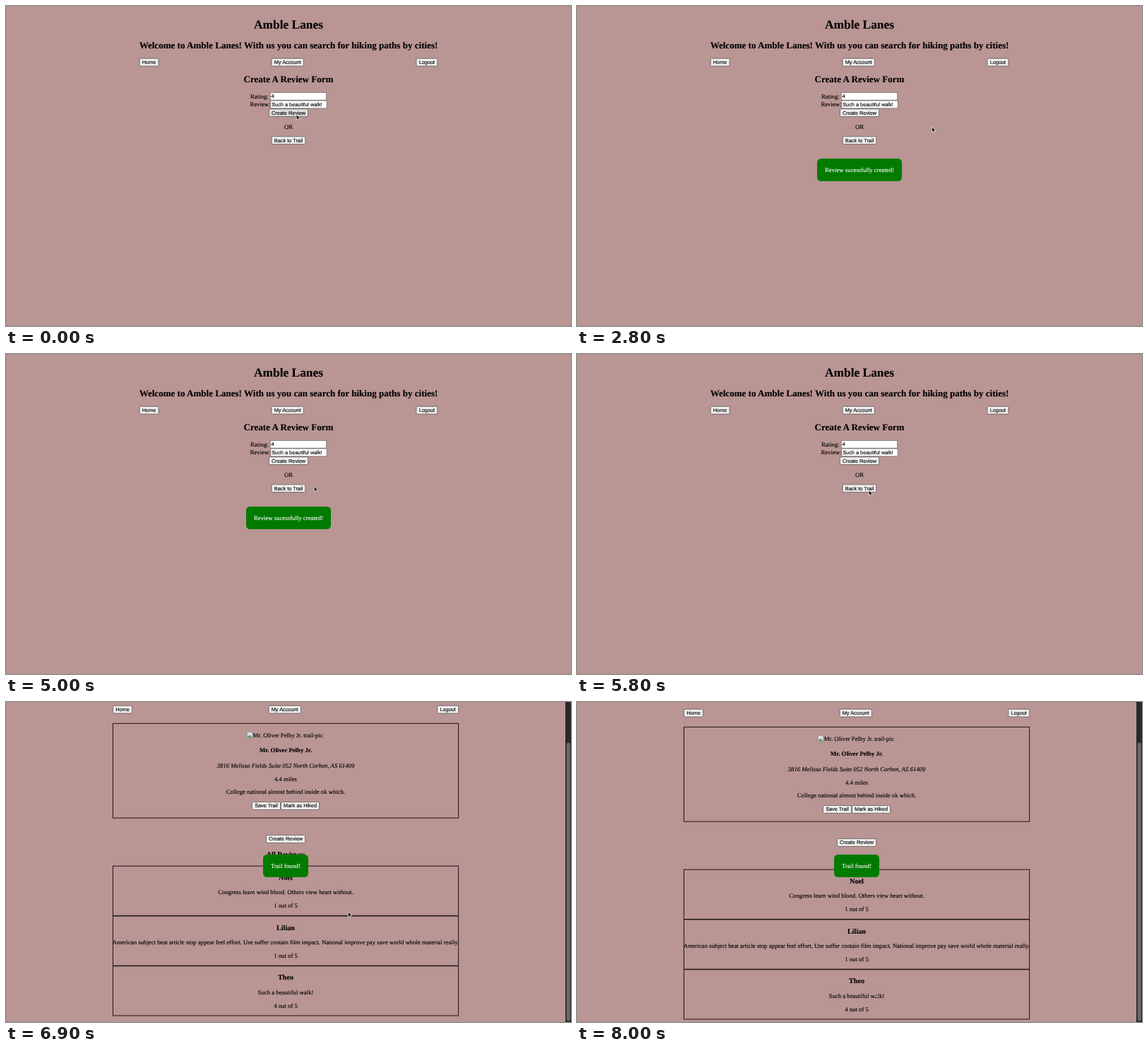
An HTML page that plays this animation: 800 px wide and 453 px high, repeating every 8100 ms.

```html
<!DOCTYPE html>
<html lang="en">
<head>
<meta charset="utf-8">
<title>Amble Lanes</title>
<style>
html, body { margin: 0; width: 100%; height: 100%; overflow: hidden; background: #b99593; }
svg { display: block; width: 800px; height: 453px; color: #000; }
text {
  font: 8.74px "Liberation Serif", "Times New Roman", serif;
  text-anchor: middle; text-rendering: geometricPrecision; white-space: pre;
  fill: currentColor; stroke: currentColor; stroke-width: .12;
}
.h1 { font-size: 17.4px; font-weight: bold; }
.h2 { font-size: 13.05px; font-weight: bold; }
.h3 { font-size: 10.2px; font-weight: bold; }
.h4 { font-weight: bold; }
.it { font-style: italic; }
.left { text-anchor: start; }
.ui { font: 7.35px "Liberation Sans", Arial, sans-serif; }
.btn { fill: #efefef; stroke: #5f5757; stroke-width: .8; }
.hover { fill: #dedede; }
.field { fill: #fff; stroke: #767070; stroke-width: .8; }
.card { fill: none; stroke: #1c1515; stroke-width: 1; }
.toast { color: #fff; }
.toast rect { fill: #007b00; }
</style>
</head>
<body>
<svg id="stage" viewBox="0 0 800 453"></svg>
<script>
const LOOP = 8100, STEP = 100;

const text = (s, x, y, cls = '') => `<text x="${x}" y="${y}" class="${cls}">${s}</text>`;
const rect = (x, y, w, h, cls, r = 0) =>
  `<rect x="${x}" y="${y}" width="${w}" height="${h}" rx="${r}" class="${cls}"/>`;
const button = (s, x, y, w, id = '') =>
  `<g id="${id}">${rect(x + .4, y + .4, w - .8, 10.8, 'btn', 1.4)}${text(s, x + w / 2, y + 8.2, 'ui')}</g>`;
const field = (s, x, y) => rect(x + .4, y + .4, 79.4, 10.8, 'field') + text(s, x + 1.8, y + 8.4, 'ui left');
const toast = (id, s, x, w) =>
  `<g id="${id}" class="toast">${rect(x - w / 2, 216, w, 32, '', 5.5)}${text(s, x, 235)}</g>`;

const header = (mid, left, right) =>
  text('Amble Lanes', mid, 32, 'h1') +
  text('Welcome to Amble Lanes! With us you can search for hiking paths by cities!', mid, 59.6, 'h2') +
  button('Home', left, 73.8, 27.6) +
  button('My Account', mid - 24.3, 73.8, 46) +
  button('Logout', right - 30.6, 73.8, 30.6);

const review = ([name, words, stars], i) => {
  const y = 301.2 + i * 70.8;
  return rect(151.4, y, 489.2, 70.2, 'card') + text(name, 396, y + 19.6, 'h3') +
    text(words, 396, y + 40.2) + text(stars + ' out of 5', 396, y + 59);
};

const formPage = header(400, 188.8, 611.2) +
  text('Create A Review Form', 400, 107.8, 'h2') +
  text('Rating:', 346, 130.5, 'left') + field('4', 373.8, 122) +
  text('Review:', 345.4, 142.3, 'left') + field('Such a beautiful walk!', 374.4, 133.6) +
  button('Create Review', 372, 145.4, 56, 'create') +
  text('OR', 400, 174) +
  button('Back to Trail', 375.8, 184.4, 48.4);

const brokenImage = `<path d="M341.6 111.4h5l2.2 2.2v6h-7.2z" fill="#d8e2ee" stroke="#8a8a8a" stroke-width=".6"/>
  <path d="M342 118.6l2.6-3 4 3.6v.2H342z" fill="#4fa447"/>`;

const trailPage = header(396, 151.2, 641) +
  rect(151.4, 99.4, 489.2, 133.8, 'card') + brokenImage +
  text('Mr. Oliver Pelby Jr. trail-pic', 349.8, 118.6, 'left') +
  text('Mr. Oliver Pelby Jr.', 396, 140, 'h4') +
  text('3816 Melissa Fields Suite 052 North Corben, AS 61409', 396, 161.6, 'it') +
  text('4.4 miles', 396, 180.6) +
  text('College national almost behind inside ok which.', 396, 199.4) +
  button('Save Trail', 348, 210.2, 41) + button('Mark as Hiked', 389, 210.2, 55) +
  button('Create Review', 368, 257.2, 56) +
  text('All Reviews:', 396, 288.2, 'h3') +
  [['Noel', 'Congress learn wind blood. Others view heart without.', 1],
   ['Lilian', 'American subject beat article stop appear feel effort. Use suffer contain film impact. National improve pay save world whole material really.', 1],
   ['Theo', 'Such a beautiful walk!', 4]].map(review).join('');

const beam = 'M-2-5Q0-5 0-3.6Q0-5 2-5M0-4V4M-2 5Q0 5 0 3.6Q0 5 2 5';

const stage = document.getElementById('stage');
stage.innerHTML = `<rect width="800" height="453" fill="#b99593"/>
  <g id="formPage">${formPage}</g>
  <g id="trailPage"><g id="content">${trailPage}</g>
    <rect x="792" width="8" height="453" fill="#2a2929"/>
    <rect id="thumb" x="793.8" y="1.2" width="5" height="394" rx="2.5" fill="#6c6a6a"/></g>
  ${toast('created', 'Review sucessfully created!', 400, 120)}
  ${toast('found', 'Trail found!', 396, 64)}
  <path id="arrow" d="M0 0V7.3L1.7 5.8 2.8 8.3 4.1 7.7 3 5.3H5.3Z" stroke="#fff" stroke-width=".7"/>
  <g id="beam" fill="none"><path d="${beam}" stroke="#eee" stroke-width="1.8"/>
    <path d="${beam}" stroke="#222" stroke-width=".7"/></g>`;
const el = id => document.getElementById(id);

// Eased value of a list of [time, value] keys.
const track = (keys, t) => {
  const i = keys.findIndex(k => k[0] > t);
  if (i < 0) return keys[keys.length - 1][1];
  if (i === 0) return keys[0][1];
  const [t0, a] = keys[i - 1], [t1, b] = keys[i], p = (t - t0) / (t1 - t0);
  return a + (b - a) * p * p * (3 - 2 * p);
};

const cursorX = [[400, 411.2], [1000, 502.5], [4600, 502.5], [5200, 413.3], [5900, 413.3], [6400, 484.3], [7200, 484.3], [8000, 424.5]];
const cursorY = [[400, 153.6], [1000, 171.2], [4600, 171.2], [5200, 193], [5900, 193], [6400, 297], [7200, 297], [8000, 411.5]];
const scrollKeys = [[6600, 0], [6900, 69], [7200, 64]];
const createdKeys = [[500, 0], [800, 1], [5400, 1], [5700, 0]];
const foundKeys = [[5900, 0], [6200, 1]];

const show = (id, on) => el(id).setAttribute('display', on ? 'inline' : 'none');

function draw(now) {
  const t = Math.floor(now % LOOP / STEP) * STEP;
  const x = track(cursorX, t), y = track(cursorY, t), scroll = track(scrollKeys, t);
  const onTrail = t >= 6000, onText = t >= 7900;
  show('formPage', !onTrail);
  show('trailPage', onTrail);
  el('content').setAttribute('transform', `translate(0 ${-scroll})`);
  el('thumb').setAttribute('y', 1.2 + Math.min(scroll, 64) * .88);
  el('created').setAttribute('opacity', track(createdKeys, t));
  el('found').setAttribute('opacity', track(foundKeys, t));
  el('create').firstChild.classList.toggle('hover', t < 600);
  show('arrow', !onText);
  show('beam', onText);
  for (const id of ['arrow', 'beam']) el(id).setAttribute('transform', `translate(${x} ${y})`);
  requestAnimationFrame(draw);
}
draw(performance.now());
</script>
</body>
</html>
```
